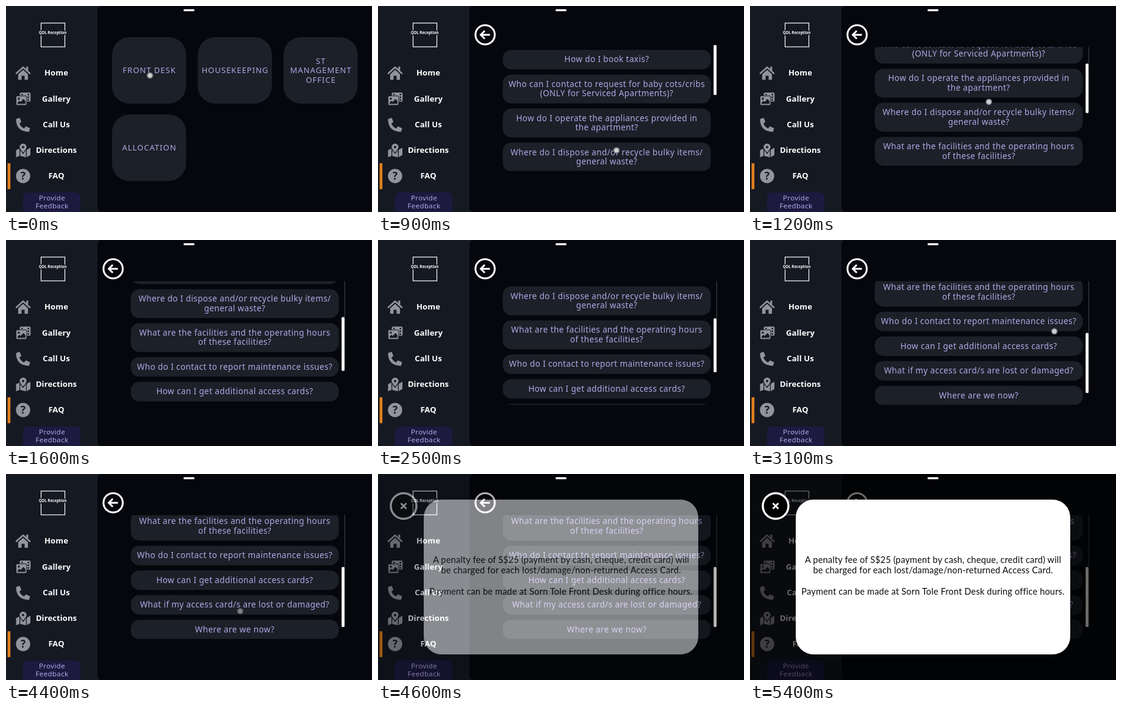
An HTML page that plays this animation: 600x338 px, repeating every 8 s.

```html
<!DOCTYPE html>
<html lang="en">
<head>
<meta charset="utf-8">
<title>Concierge FAQ</title>
<style>
  html, body { margin: 0; width: 100%; height: 100%; overflow: hidden; background: #05070c; }
  svg { display: block; width: 100%; height: 100%; }
  text { font-family: "Noto Sans", "Open Sans", sans-serif; text-anchor: middle; }
  .nav { font-size: 13px; font-weight: 600; letter-spacing: .1px; fill: #fff; }
  .fb { font-size: 11.5px; font-weight: 500; letter-spacing: .35px; fill: #b3a7e6; }
  .tile { font-size: 13px; letter-spacing: 1px; fill: #b3a7e6; }
  .card { font-size: 13.5px; letter-spacing: .4px; fill: #b3a7e6; }
  .note { font-family: Lato, "Open Sans", sans-serif; font-size: 14.5px; letter-spacing: .19px; fill: #0c0c0c; }
  .brand { font-size: 6.2px; font-weight: 700; fill: #fff; stroke: #151922; stroke-width: 3px; paint-order: stroke; }
  .icon { fill: #92939d; }
  .cut { fill: #151922; }
</style>
</head>
<body>
<svg viewBox="0 0 600 338" preserveAspectRatio="none">
  <defs>
    <clipPath id="port"><rect x="200" y="67.5" width="350" height="203"/></clipPath>
  </defs>
  <rect width="600" height="338" fill="#151922"/>
  <rect x="150" width="470" height="338" rx="7" fill="#05070c"/>

  <rect x="57.5" y="28" width="39" height="39" fill="none" stroke="#fff" stroke-width="1.2"/>
  <text class="brand" x="76.5" y="45.5">QDL Reception</text>

  <g class="icon">
    <path d="M17 110.5 28 100.5 39 110.5" fill="none" stroke="#92939d" stroke-width="2.6" stroke-linecap="round" stroke-linejoin="round"/>
    <path d="M20 112 28 104.7 36 112V121H30.5V114.5H25.5V121H20Z"/>
    <rect x="33.2" y="99.5" width="3.2" height="6"/>

    <rect x="22.5" y="142" width="17.8" height="15" rx="2"/>
    <path class="cut" d="M25 144h2.5v2H25zM35.5 144H38v2.5h-2.5zM35.5 148.5H38v2.5h-2.5zM35.5 153H38v2.5h-2.5z"/>
    <rect x="16.5" y="147.5" width="17.5" height="15.5" rx="2" stroke="#151922"/>
    <circle class="cut" cx="21" cy="152" r="1.7"/>
    <path class="cut" d="M19 160.5V158.5L22 155.5 24 157.5 28.5 152.5 31.8 156V160.5Z"/>

    <path d="M16.8 185.3 22.5 183.5 25.2 190 22 193Q24.5 198.5 29.5 201L32.5 197.5 39.5 200.5 38 206Q37.5 206.5 36 206.5 17 205 16.5 187Z"/>

    <path d="M16.5 236.5 22 234V246L16.5 248.3ZM23.3 236.5 28 243 32.7 236.5V248.3L23.3 246ZM34 236 40 232.5V244.5L34 248Z"/>
    <path d="M28 240.5Q22.3 234 22.3 231.5A5.7 5.7 0 0 1 33.7 231.5Q33.7 234 28 240.5Z"/>
    <circle class="cut" cx="28" cy="231.5" r="1.9"/>

    <circle cx="28" cy="279" r="11.7"/>
    <text class="cut" x="28" y="285.3" font-size="17" font-weight="800">?</text>
  </g>
  <rect x="2.6" y="258" width="4.6" height="42.5" fill="#e0801c"/>
  <g id="nav"></g>
  <rect x="28" y="306" width="94" height="40" rx="8" fill="#1d1a40"/>
  <text class="fb" x="75.5" y="319">Provide</text>
  <text class="fb" x="75.5" y="332">Feedback</text>

  <g id="tiles"></g>

  <g id="faq">
    <g fill="none" stroke="#fff" stroke-width="3">
      <circle cx="175.6" cy="47.2" r="15.8"/>
      <path d="M183.5 47.2H169M175 40.7 168.5 47.2 175 53.7"/>
    </g>
    <g clip-path="url(#port)"><g id="list"></g></g>
    <path id="track" stroke="#5a5c62" stroke-width=".8"/>
    <rect id="thumb" x="550.2" width="4.8" rx="1.6" fill="#fff"/>
  </g>

  <g id="touch">
    <circle r="5.3" fill="#77787c"/>
    <circle r="3.6" fill="#cfcfd2"/>
  </g>

  <g id="popup">
    <rect width="600" height="338" fill="#000" opacity=".58"/>
    <rect x="75" y="42" width="450" height="254" rx="29" fill="#fff"/>
    <circle cx="42" cy="52.5" r="21" fill="#000" stroke="#fff" stroke-width="3.4"/>
    <path d="M37.5 48 46.5 57M46.5 48 37.5 57" stroke="#fff" stroke-width="2.6"/>
    <text class="note" x="300" y="146">A penalty fee of S$25 (payment by cash, cheque, credit card) will</text>
    <text class="note" x="300" y="163">be charged for each lost/damage/non-returned Access Card.</text>
    <text class="note" x="300" y="198">Payment can be made at Sorn Tole Front Desk during office hours.</text>
  </g>
  <rect x="291" y="5.2" width="18" height="3.4" rx="1.6" fill="#fff"/>
</svg>
<script>
(() => {
  const LOOP = 8000;
  const $ = id => document.getElementById(id);

  function add(parent, tag, attrs, text) {
    const el = document.createElementNS("http://www.w3.org/2000/svg", tag);
    for (const k in attrs) el.setAttribute(k, attrs[k]);
    if (text) el.textContent = text;
    parent.appendChild(el);
  }

  ["Home", "Gallery", "Call Us", "Directions", "FAQ"].forEach((label, i) =>
    add($("nav"), "text", { class: "nav", x: 82.5, y: 114.3 + i * 42.2 }, label));

  ["FRONT DESK", "HOUSEKEEPING", "ST|MANAGEMENT|OFFICE", "ALLOCATION"].forEach((label, i) => {
    const x = 173.7 + i % 3 * 140.6, y = 51 + Math.floor(i / 3) * 127;
    add($("tiles"), "rect", { x, y, width: 121.6, height: 109.3, rx: 29, fill: "#1c2028" });
    const lines = label.split("|");
    lines.forEach((s, n) => add($("tiles"), "text",
      { class: "tile", x: x + 61.3, y: y + 59.2 + (n - (lines.length - 1) / 2) * 15.4 }, s));
  });

  let rowY = 72;
  [
    "How do I book taxis?",
    "Who can I contact to request for baby cots/cribs|(ONLY for Serviced Apartments)?",
    "How do I operate the appliances provided in|the apartment?",
    "Where do I dispose and/or recycle bulky items/|general waste?",
    "What are the facilities and the operating hours|of these facilities?",
    "Who do I contact to report maintenance issues?",
    "How can I get additional access cards?",
    "What if my access card/s are lost or damaged?",
    "Where are we now?"
  ].forEach(question => {
    const lines = question.split("|"), height = lines.length > 1 ? 47.3 : 32;
    add($("list"), "rect", { x: 204.5, y: rowY, width: 341, height, rx: 14, fill: "#1c2028" });
    lines.forEach((s, n) => add($("list"), "text", { class: "card", x: 375, y: rowY + 20.4 + n * 15.5 }, s));
    rowY += height + 8.5;
  });

  // Piecewise linear value from [position, value] points
  function along(points, p) {
    if (p <= points[0][0]) return points[0][1];
    for (let i = 1; i < points.length; i++) {
      const [a, u] = points[i - 1], [b, v] = points[i];
      if (p <= b) return u + (v - u) * (p - a) / (b - a);
    }
    return points[points.length - 1][1];
  }

  const scrollAt = [[930, 0], [1200, 65], [1400, 120], [1550, 141], [1700, 148],
    [2760, 148], [2900, 180], [3000, 208], [3080, 218]];
  const thumbTop = [[0, 64], [65, 94.5], [148, 128.5], [218, 152.5]];
  const thumbEnd = [[0, 146], [65, 175.5], [148, 217], [218, 251]];

  // Each touch: start, release, fade end, then from and to points
  const touches = [
    [0, 120, 300, 236, 114, 236, 114],
    [820, 1380, 1550, 391, 237, 392, 110],
    [2650, 3110, 3300, 497, 226, 499, 148],
    [4200, 4340, 4480, 384, 225, 384, 225]
  ];

  function drawTouch(t) {
    const hit = touches.find(([a, , c]) => t >= a && t < c);
    $("touch").setAttribute("opacity", hit ? along([[hit[1], 1], [hit[2], 0]], t) : 0);
    if (!hit) return;
    const [a, b, , x0, y0, x1, y1] = hit;
    const k = along([[a + 80, 0], [b, 1]], t);
    $("touch").setAttribute("transform", `translate(${x0 + (x1 - x0) * k} ${y0 + (y1 - y0) * k})`);
  }

  function draw(t) {
    $("tiles").setAttribute("opacity", along([[200, 1], [320, 0]], t));
    $("faq").setAttribute("opacity", along([[280, 0], [420, 1]], t));
    $("popup").setAttribute("opacity", along([[4450, 0], [4750, 1]], t));

    const s = along(scrollAt, t), y = along(thumbTop, s);
    $("list").setAttribute("transform", `translate(0 ${-s})`);
    $("thumb").setAttribute("y", y);
    $("thumb").setAttribute("height", along(thumbEnd, s) - y);
    $("track").setAttribute("d", s > 0 ? `M555.3 67.5V${Math.max(y, 67.5)}` : "");
    drawTouch(t);
  }

  const start = performance.now();
  function tick() {
    draw((performance.now() - start) % LOOP);
    requestAnimationFrame(tick);
  }
  tick();
})();
</script>
</body>
</html>
```
